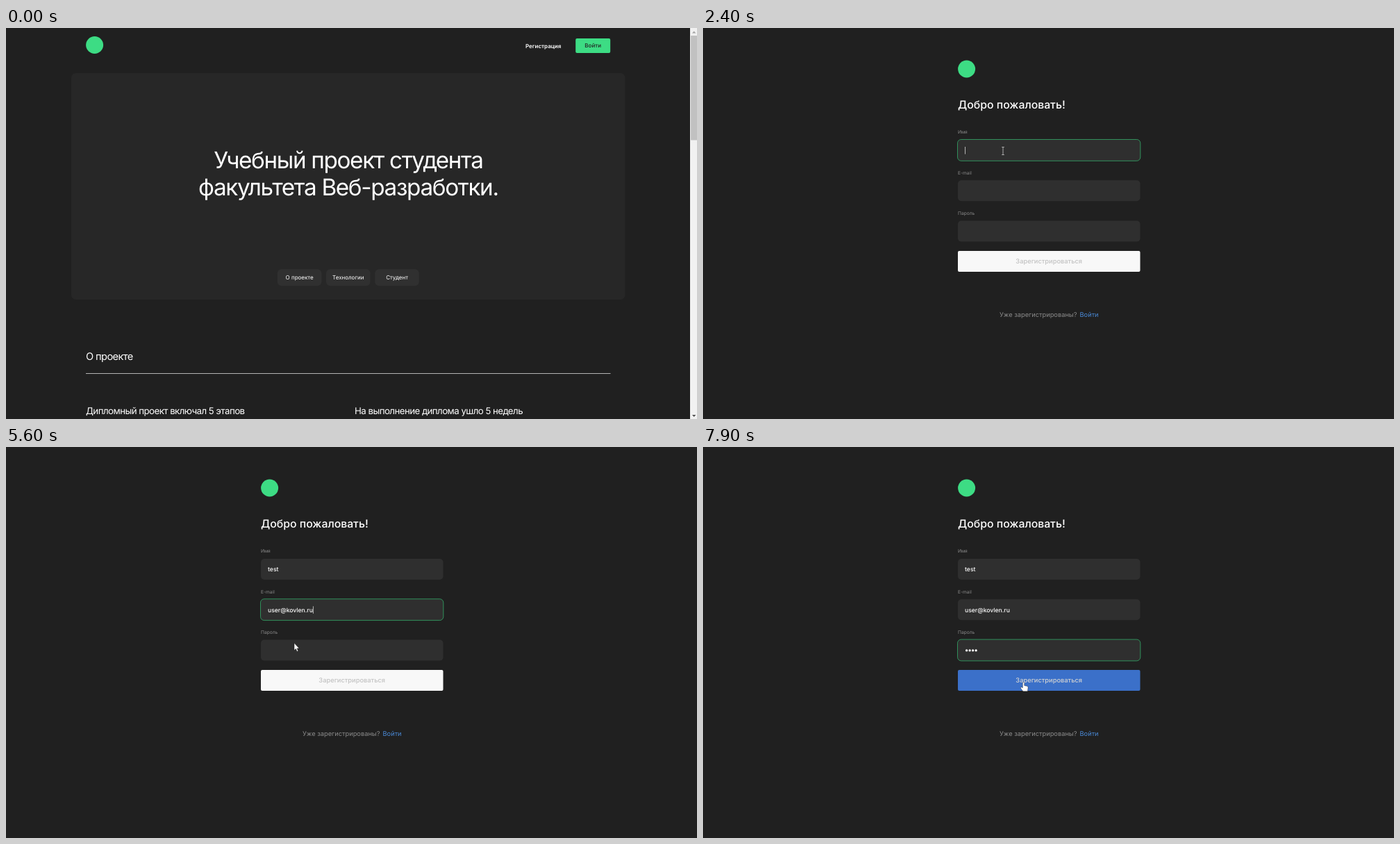
An HTML page that plays this animation: 995x563 px, repeating every 8 s.

```html
<!DOCTYPE html>
<html lang="ru">
<head>
<meta charset="utf-8">
<title>Регистрация</title>
<style>
  html, body { margin: 0; width: 100%; height: 100%; overflow: hidden; background: #202020; }
  svg { display: block; width: 100vw; height: 100vh; font-family: Inter, sans-serif; text-rendering: geometricPrecision; }
  text { fill: #fff; }
  .mid { text-anchor: middle; }
  .nav { font-size: 8px; font-weight: 500; }
  .strong { font-weight: 600; }
  .tab { font-size: 8px; }
  .hero { font-size: 33.25px; letter-spacing: -.04em; }
  .h2 { font-size: 14.6px; letter-spacing: -.04em; }
  .h3 { font-size: 13.27px; letter-spacing: -.04em; }
  .welcome { font-size: 15.8px; font-weight: 500; }
  .label { font-size: 6.64px; fill: #8b8b8b; }
  .error { font-size: 6.64px; fill: #b52c50; }
  .value { font-size: 8.62px; font-weight: 500; }
  .submit { font-size: 9.29px; font-weight: 500; }
  .foot { font-size: 9.29px; fill: #8b8b8b; }
  .link { fill: #4a8ad8; }
</style>
</head>
<body>
<svg viewBox="0 0 995 563">
  <rect width="995" height="563" fill="#202020"/>

  <g id="home">
    <circle cx="127.6" cy="24.5" r="12.5" fill="#3ddc84"/>
    <text id="signup" class="nav strong" x="748" y="29">Регистрация</text>
    <rect x="820.2" y="15" width="50" height="21" rx="2" fill="#3ddc84"/>
    <text class="nav mid" x="845.2" y="28.3" style="fill:#222">Войти</text>
    <rect x="94" y="65" width="797.5" height="326" rx="6.6" fill="#272727"/>
    <g class="hero mid">
      <text x="492.9" y="202">Учебный проект студента</text>
      <text x="492.9" y="240.7">факультета Веб-разработки.</text>
    </g>
    <g id="tabs"></g>
    <text class="h2" x="115" y="478">О проекте</text>
    <rect x="115" y="497" width="755.5" height="1" fill="#b4b4b4"/>
    <text class="h3" x="115" y="556.1">Дипломный проект включал 5 этапов</text>
    <text class="h3" x="502" y="556.1">На выполнение диплома ушло 5 недель</text>
    <rect x="985" width="10" height="563" fill="#f1f1f1"/>
    <rect x="986" y="11" width="9" height="150.5" fill="#c1c1c1"/>
    <path d="M988 7.5l2.7-3 2.7 3z" fill="#a3a3a3"/>
    <path d="M988 557l2.7 3 2.7-3z" fill="#505050"/>
  </g>

  <g id="form">
    <circle cx="379.6" cy="59" r="12.5" fill="#3ddc84"/>
    <text class="welcome" x="367" y="115.8">Добро пожаловать!</text>
    <g id="name"></g>
    <text id="error" class="error" x="367" y="204">Текст должен быть не короче 2 симв. Длина текста сейчас: 1 символ.</text>
    <g id="lower">
      <g id="mail"></g>
      <g id="pass"></g>
      <g id="submit">
        <rect id="plate" x="367" y="321" width="262.5" height="30" rx="2"/>
        <text id="caption" class="submit mid" x="498.2" y="339.3">Зарегистрироваться</text>
      </g>
      <text class="foot" x="427" y="416">Уже зарегистрированы?</text>
      <text class="foot link" x="542.5" y="416">Войти</text>
    </g>
  </g>

  <g id="pointer">
    <path id="arrow" fill="#fff" stroke="#111" stroke-width=".5" d="M0 0V10.4L2.3 8.3 4 12.2 5.7 11.4 4.1 7.7H7.2Z"/>
    <path id="hand" fill="#fff" stroke="#111" stroke-width=".4" d="M-1.2 1Q0-.6 1.2 1V5L5 5.8Q6.8 6.2 6.6 8L6 12.4Q5.8 13.3 5 13.3H0Q-.8 13.3-1.3 12.5L-4 8.8Q-4.6 7.6-3.2 7.2L-1.2 8.2Z"/>
    <path id="beam" fill="none" stroke="#ddd" stroke-width=".7" d="M-1.8-5.5H1.8M0-5.5V5.5M-1.8 5.5H1.8"/>
  </g>
</svg>

<script>
const LOOP = 8000, STEP = 100;
const $ = id => document.getElementById(id);
const show = (el, on) => el.setAttribute('display', on ? 'inline' : 'none');

$('tabs').innerHTML = ['О проекте', 'Технологии', 'Студент'].map((label, i) => `
  <rect x="${390.8 + i * 70.2}" y="347.3" width="63.6" height="24" rx="6" fill="#303030"/>
  <text class="tab mid" x="${422.6 + i * 70.2}" y="362">${label}</text>`).join('');

// Typing schedules: [time, number of characters]
const fields = [
  { id: 'name', label: 'Имя', text: 'test', from: 2400, to: 5100,
    keys: [[3000, 1], [3200, 2], [3500, 3], [3700, 4]] },
  { id: 'mail', label: 'E-mail', text: 'user@kovlen.ru', from: 5100, to: 6100,
    keys: [[5300, 14]] },
  { id: 'pass', label: 'Пароль', text: '••••', from: 6100, to: LOOP,
    keys: [[6500, 1], [6700, 2], [6900, 3], [7200, 4]] }
];
const DOT = 4.5;

fields.forEach((f, i) => {
  const y = 161 + i * 58.3, g = $(f.id);
  f.secret = f.id === 'pass';
  const dots = [0, 1, 2, 3].map(n =>
    `<circle cx="${379.6 + n * DOT}" cy="${y + 15.3}" r="1.65" fill="#fff"/>`).join('');
  g.innerHTML = `
    <text class="label" x="367" y="${y - 8.7}">${f.label}</text>
    <rect x="367" y="${y}" width="262.5" height="30" rx="5" fill="#2f2f2f"/>
    <rect class="ring" x="366.5" y="${y - .5}" width="263.3" height="30.8" rx="5.3" fill="none" stroke="#3ddc84" stroke-opacity=".6"/>
    ${f.secret ? dots : `<text class="value" x="377" y="${y + 18.3}"></text>`}
    <rect class="caret" y="${y + 10}" width=".7" height="10.6" fill="#eee"/>`;
  f.ring = g.querySelector('.ring');
  f.caret = g.querySelector('.caret');
  f.value = g.querySelector('.value');
  f.dots = [...g.querySelectorAll('circle')];
});

const blinkStarts = [2500, 3000, 3200, 3500, 3700, 5100, 5400, 6100, 6500, 6700, 6900, 7200];
const caretOn = t => {
  const start = blinkStarts.filter(s => s <= t).pop() || blinkStarts[0];
  return (t - start) % 1000 < 500;
};

function drawField(f, t) {
  const focused = t >= f.from && t < f.to;
  const count = f.keys.reduce((n, [at, c]) => t >= at ? c : n, 0);
  let width = count * DOT;
  if (f.secret) {
    f.dots.forEach((d, i) => show(d, i < count));
  } else {
    f.value.textContent = f.text.slice(0, count);
    width = count ? f.value.getComputedTextLength() : 0;
  }
  show(f.ring, focused);
  show(f.caret, focused && caretOn(t));
  f.caret.setAttribute('x', 377.1 + width);
  return count;
}

// Pointer legs: points are [time, x, y]
const legs = [
  [[500, 716, 180], [800, 781.5, 24], [1800, 781.5, 24], [2200, 432, 177], [3000, 432, 177]],
  [[4400, 428, 190], [4500, 418, 214], [4600, 418, 214], [4800, 412, 235], [5200, 412, 235],
   [5300, 412, 264], [5500, 412, 264], [5600, 415, 282.3], [5700, 416, 291], [6500, 416, 291]],
  [[7600, 428, 296], [7900, 461.5, 338.5], [8000, 461.5, 338.5]]
];

function pointerAt(t) {
  const leg = legs.find(l => t >= l[0][0] && t < l[l.length - 1][0]);
  if (!leg) return null;
  const i = leg.findIndex(p => p[0] > t);
  const [t0, x0, y0] = leg[i - 1], [t1, x1, y1] = leg[i];
  const k = (t - t0) / (t1 - t0), e = k * k * (3 - 2 * k);
  return [x0 + (x1 - x0) * e, y0 + (y1 - y0) * e];
}

function pointerKind(t) {
  if (t >= 800 && t < 1900 || t >= 7800) return 'hand';
  if (t >= 2200 && t < 5300 || t >= 5700 && t < 7700) return 'beam';
  return 'arrow';
}

function render(ms) {
  const t = Math.floor(ms % LOOP / STEP) * STEP;
  const onForm = t >= 1500;
  show($('home'), !onForm);
  show($('form'), onForm);
  $('signup').setAttribute('opacity', t >= 800 ? .75 : 1);

  const [nameLength, , passLength] = fields.map(f => drawField(f, t));
  const tooShort = nameLength === 1;
  show($('error'), tooShort);
  $('lower').setAttribute('transform', `translate(0 ${tooShort ? 8 : 0})`);

  const ready = passLength > 0;
  $('plate').setAttribute('fill', ready ? '#4285f4' : '#f8f8f8');
  $('caption').style.fill = ready ? '#fff' : '#c2c2c2';
  $('submit').setAttribute('opacity', t >= 7800 ? .8 : 1);

  const pos = pointerAt(t);
  show($('pointer'), pos);
  if (pos) $('pointer').setAttribute('transform', `translate(${pos[0]} ${pos[1]})`);
  ['arrow', 'hand', 'beam'].forEach(k => show($(k), k === pointerKind(t)));
}

const begin = performance.now();
function tick() {
  render(performance.now() - begin);
  requestAnimationFrame(tick);
}
tick();
</script>
</body>
</html>
```
